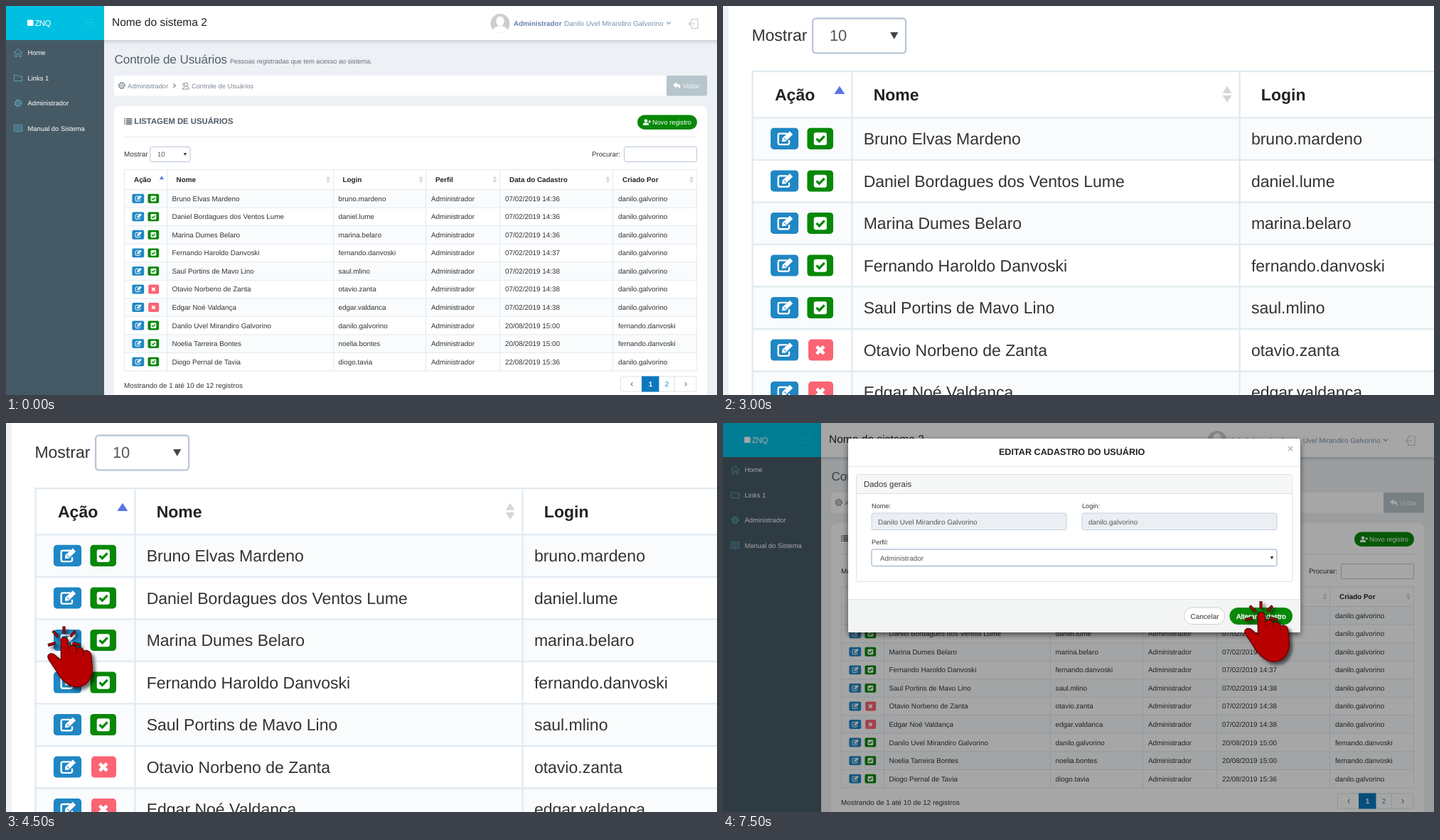
An HTML page that plays this animation: 1000x548 px, repeating every 8 s.

```html
<!DOCTYPE html>
<html lang="pt-BR">
<head>
<meta charset="utf-8">
<title>Controle de Usuários</title>
<style>
html, body { margin: 0; width: 100%; height: 100%; overflow: hidden; background: #edf0f4; }
svg { display: block; width: 1000px; height: 548px; font-family: "Liberation Sans", Arial, sans-serif; text-rendering: geometricPrecision; }
</style>
</head>
<body>
<svg id="stage" viewBox="0 0 1000 548"></svg>
<script>
const GREEN = '#078807', BLUE = '#1f87c4', LINE = '#e2eaf0';
const OWNER = 'Danilo Uvel Mirandiro Galvorino', OWNER_LOGIN = 'danilo.galvorino', CLERK = 'fernando.danvoski';

const text = (x, y, s, size = 9.9, fill = '#333', extra = '') =>
  `<text x="${x}" y="${y}" font-size="${size}" fill="${fill}" ${extra}>${s}</text>`;
const bold = (x, y, s, size = 9.9, fill = '#222', extra = '') =>
  text(x, y, s, size, fill, 'font-weight="700" ' + extra);
const rect = (x, y, w, h, fill, r = 0, extra = '') =>
  `<rect x="${x}" y="${y}" width="${w}" height="${h}" rx="${r}" fill="${fill}" ${extra}/>`;
const path = (d, fill, extra = '') => `<path d="${d}" fill="${fill}" ${extra}/>`;
const line = (d, stroke, width = 1, extra = '') =>
  `<path d="${d}" fill="none" stroke="${stroke}" stroke-width="${width}" ${extra}/>`;
const at = (x, y, body, scale = 1) => `<g transform="translate(${x} ${y}) scale(${scale})">${body}</g>`;
const group = (id, body) => `<g id="${id}">${body}</g>`;
const ellipse = (cx, cy, rx, ry, extra) => `<ellipse cx="${cx}" cy="${cy}" rx="${rx}" ry="${ry}" ${extra}/>`;

// Icons are drawn around their own centre.
const gear = c => `<circle r="4.4" fill="none" stroke="${c}" stroke-width="1.8" stroke-dasharray="2.1 1.35"/>` +
  `<circle r="3.7" fill="none" stroke="${c}"/><circle r="1.5" fill="none" stroke="${c}"/>`;
const home = c => line('M-6 0L0-5.5L6 0M-4.2-1.5V5.5H-1.5V1H1.5V5.5H4.2V-1.5', c);
const folder = c => line('M-5.5-4H-1.5L0-2.3H5.5V4.2H-5.5Z', c);
const book = c => line('M0-4Q-3-5.5-5.8-4.6V4.4Q-3 3.8 0 5Q3 3.8 5.8 4.4V-4.6Q3-5.5 0-4V5M-4.3-2.2H-1.6M-4.3 0H-1.6M-4.3 2.2H-1.6M1.6-2.2H4.3M1.6 0H4.3M1.6 2.2H4.3', c);
const people = c => `<circle cx="1" cy="-2" r="2.8" fill="none" stroke="${c}"/>` +
  line('M-4 5Q-3 1.2 0 .8M2 .8Q5 1.5 5.5 5H-5.5M-2-4.5Q-5-4-4-1Q-3.5 0-4 1', c);
const list = c => line('M-5.5-3.6H-4M-2.8-3.6H5.5M-5.5-1.2H-4M-2.8-1.2H5.5M-5.5 1.2H-4M-2.8 1.2H5.5M-5.5 3.6H-4M-2.8 3.6H5.5', c, 1.5);
const addUser = `<circle cx="-1.5" cy="-2" r="2.3" fill="#fff"/>` +
  path('M-5.5 4.2V2.5Q-5.2.6-3.2.6H.2Q2.2.6 2.5 2.5V4.2Z', '#fff') + line('M1.8-1H5.6M3.7-2.9V.9', '#fff', 1.3);
const edit = line('M1.5-3H-3Q-4-3-4-2V2.6Q-4 3.6-3 3.6H1.6Q2.6 3.6 2.6 2.6V1', '#fff', 1) +
  path('M-1.7 1.9L-1.5-.3L3-4.4L4.8-2.5L.5 1.7Z', '#fff') + line('M-.4-.2L.7.9', BLUE, .45);
const check = rect(-3.9, -3.8, 7.8, 7.7, '#fff', 1.3) + line('M-2.3-.1L-.6 1.6L2.5-1.6', GREEN, 1.4);
const cross = line('M-2.2-2.2L2.2 2.2M2.2-2.2L-2.2 2.2', '#fff', 2);

function tableRow([name, login, date, creator, off], i) {
  const y = 258.5 + 25.55 * i, mid = y + 12.75, base = y + 16.2;
  return rect(166.5, y, 805, 25.55, i % 2 ? '#fff' : '#f9fbfd') +
    line(`M166 ${y}H972`, LINE) +
    rect(177.4, mid - 6.5, 16.8, 12.9, BLUE, 2) + at(186, mid - .1, edit) +
    rect(off ? 200.2 : 199.5, mid - 6.5, off ? 15 : 15.7, 12.9, off ? '#fb6472' : GREEN, 2) +
    at(207.4, mid, off ? cross : check) +
    text(233.5, base, name) + text(467.5, base, login) + text(598, base, 'Administrador') +
    text(702, base, date) + text(861, base, creator);
}

const sorter = x => path(`M${x - 2.8} 243.7h5.6l-2.8-4.3zM${x - 2.8} 245.1h5.6l-2.8 4.3z`, '#d6d6d6');

function table() {
  const rows = [
    ['Bruno Elvas Mardeno', 'bruno.mardeno', '07/02/2019 14:36', OWNER_LOGIN],
    ['Daniel Bordagues dos Ventos Lume', 'daniel.lume', '07/02/2019 14:36', OWNER_LOGIN],
    ['Marina Dumes Belaro', 'marina.belaro', '07/02/2019 14:36', OWNER_LOGIN],
    ['Fernando Haroldo Danvoski', CLERK, '07/02/2019 14:37', OWNER_LOGIN],
    ['Saul Portins de Mavo Lino', 'saul.mlino', '07/02/2019 14:38', OWNER_LOGIN],
    ['Otavio Norbeno de Zanta', 'otavio.zanta', '07/02/2019 14:38', OWNER_LOGIN, true],
    ['Edgar Noé Valdança', 'edgar.valdanca', '07/02/2019 14:38', OWNER_LOGIN, true],
    [OWNER, OWNER_LOGIN, '20/08/2019 15:00', CLERK],
    ['Noelia Tarreira Bontes', 'noelia.bontes', '20/08/2019 15:00', CLERK],
    ['Diogo Pernal de Tavia', 'diogo.tavia', '22/08/2019 15:36', OWNER_LOGIN],
  ];
  const heads = [[180, 'Ação'], [239.5, 'Nome'], [473.5, 'Login'], [604, 'Perfil'], [708, 'Data do Cadastro'], [867, 'Criado Por']];
  return rows.map(tableRow).join('') +
    heads.map(([x, s]) => bold(x, 248, s)).join('') +
    [453, 583.5, 687.5, 846.5, 964].map(sorter).join('') +
    path('M215.8 244.2h6.4l-3.2-4.8z', '#5a74e4') +
    line('M226.5 230V514M460.5 230V514M590.5 230V514M694.5 230V514M853.5 230V514', LINE) +
    line('M166.5 230.5H971.5V514H166.5Z', LINE);
}

function page() {
  const grey = '#7c8792', icon = '#5ba3bb', pale = '#c3c9cf';
  const items = [['Home', home], ['Links 1', folder], ['Administrador', gear], ['Manual do Sistema', book]];
  return rect(0, 0, 1000, 548, '#edf0f4') +
    rect(138, 48, 862, 6, 'url(#barShadow)') + rect(138, 0, 862, 48, '#fff') +
    rect(0, 0, 138, 548, '#465a66') + rect(0, 0, 138, 48, '#00bfe1') +
    rect(30, 19.5, 8.5, 8.5, '#fff', 1) + text(40.5, 28, 'ZNQ', 11.4, '#fff', 'letter-spacing="-.6"') +
    line('M111 19.5H123M111 23.5H123M111 27.5H123', '#1ccbe0') +
    items.map(([s, draw], i) => at(17, 66 + 35.4 * i, draw(icon)) + text(30.5, 69.3 + 35.4 * i, s, 9.4, '#fff')).join('') +
    text(149, 28.3, 'Nome do sistema 2', 15.55, '#222') +
    '<circle cx="695" cy="24.5" r="13.5" fill="#cdcdd0"/>' +
    ellipse(695, 21.5, 5.6, 7, 'fill="#fff"') + path('M685 34Q686 29.5 692 28.5H698Q704 29.5 705 34Q695 42 685 34Z', '#fff') +
    bold(714, 27.5, 'Administrador', 9.9, '#6484aa') + text(785, 27.5, OWNER, 9.9, '#7a90ac') +
    line('M929 22.5L932 25.5L935 22.5', '#8b9cb2', 1.2) +
    line('M964 22V18.5H973V31.5H964V28M969 25H960.5M963.5 22L960.5 25L963.5 28', pale, 1.1) +
    text(152.5, 81, 'Controle de Usuários', 17.1, '#55606c', 'letter-spacing="-.1"') +
    text(315, 81, 'Pessoas registradas que tem acesso ao sistema.', 9.18, '#66707a') +
    rect(152, 98, 778, 28.5, '#fff', 3) + at(162.8, 112, gear(grey), .95) + text(171, 115.5, 'Administrador', 9.25, grey) +
    line('M235 109.5L238.5 112.3L235 115', grey, 1.1) + at(252.5, 112.5, people(grey), .9) +
    text(261, 115.5, 'Controle de Usuários', 9.27, grey) +
    rect(929, 98, 57, 28.5, '#b6c5cb', 2) + text(952, 116, 'Voltar', 9.3, '#f5f8f9') +
    path('M938 111.5L943 107.3V109.8Q948.5 110 948.5 113.5Q948.5 115.5 947 117Q947.5 113.5 943 113.3V115.8Z', '#fff') +
    rect(152, 141, 834, 420, '#fff', 8) + at(171.8, 162.6, list('#535d68')) +
    bold(180.3, 166.3, 'LISTAGEM DE USUÁRIOS', 11.3, '#4f5964') +
    rect(888, 153.5, 84, 20.5, GREEN, 10.2) + at(901.5, 163.8, addUser) + text(909, 167, 'Novo registro', 9.25, '#fff') +
    line('M166 184.5H972', '#e5e9ed') +
    text(166, 212, 'Mostrar') + rect(202.8, 198.5, 56.2, 21, '#fff', 2, 'stroke="#b9c7da"') +
    text(213, 212, '10', 9.4, '#555') + path('M249.6 206.9h4.8l-2.4 4.2z', '#444') +
    text(824, 211.5, 'Procurar:', 9.7) + rect(869.5, 198.5, 102, 21, '#fff', 2, 'stroke="#b9c7da"') +
    table() +
    text(166, 537.5, 'Mostrando de 1 até 10 de 12 registros') +
    rect(864.5, 522, 106.5, 21, '#fff', 2, 'stroke="#dde3e8"') + line('M940.5 522V543', '#dde3e8') +
    rect(894, 521.5, 24.5, 22, '#0b78be') +
    line('M881.5 530L879 532.7L881.5 535.4M954.8 530L957.3 532.7L954.8 535.4', '#777', 1.1) +
    bold(903.7, 536, '1', 9.9, '#fff') + text(926.7, 536, '2', 9.9, BLUE);
}

function lens() {
  const rim = (cx, cy, rx, ry) =>
    ellipse(cx, cy, rx, ry, 'fill="none" stroke="#8c8c8c" stroke-width="7"') +
    ellipse(cx, cy, rx, ry, 'fill="none" stroke="url(#silver)" stroke-width="5.4"') +
    ellipse(cx - .5, cy - .5, rx, ry, 'fill="none" stroke="#fff" stroke-width="1.6" opacity=".8"');
  return path('M58 313A140 118 0 0 0 338 313L338 350A136 118 0 0 1 64 350Z', 'url(#band)') +
    line('M64 350A137 117 0 0 0 338 350', '#8f8f8f', 5) + line('M64 349A137 117 0 0 0 338 349', '#ededed', 3) +
    line('M76 372Q112 452 200 453Q232 453 256 446', '#fff', 8, 'opacity=".8"') +
    line('M60 330Q78 434 197 441Q270 440 312 398', '#a9adb0', 2, 'opacity=".75"') +
    ellipse(198, 313, 137, 115, 'fill="url(#glass)"') +
    path('M66 290Q100 206 200 204Q280 206 318 258Q230 226 150 268Q95 300 76 350Q64 320 66 290Z', '#fff', 'opacity=".28"') +
    rim(198, 313, 138, 116.5) +
    line('M235 202Q300 220 326 270', '#858585', 3.5, 'opacity=".7"') +
    path('M258 422L292 409L306 420L278 452L256 459L262 440Z', 'url(#metal)', 'stroke="#333" stroke-width="1.5"') +
    path('M262 428L281 420L272 440L259 452Z', '#f4f4f4') +
    path('M293 414L330 436L346 434L322 468L305 455L279 432Q281 418 293 414Z', 'url(#metal)', 'stroke="#444"') +
    line('M286 421L318 446M294 416L327 440', '#2a2a2a', 3) + line('M283 428L313 452', '#fff', 4) +
    path('M347 432Q338 433 327 446L313 468Q309 476 314 482L371 548H468L414 486Z', '#171718', 'stroke="#e6e6e6" stroke-width="1.5"') +
    path('M323 462L316 475Q315 479 319 483L376 548H397L329 468Z', 'url(#shine)') +
    line('M348 436L411 488L462 546', '#555', 2.5) + line('M346 437Q337 442 324 462', '#77787a', 2.5);
}

function modal() {
  const field = (x, y, w, label, value, fill, stroke, indent) =>
    text(x, y - 7.5, label, 9.2) + rect(x, y, w, 23.5, fill, 2.5, `stroke="${stroke}"`) +
    text(x + indent, y + 15.5, value, 9.9, '#555');
  return rect(0, 0, 1000, 548, '#000', 0, 'opacity=".35"') +
    rect(176, 22, 636, 273, '#fff', 3, 'filter="url(#drop)"') +
    bold(490.7, 45.3, 'EDITAR CADASTRO DO USUÁRIO', 12.65, '#222', 'text-anchor="middle"') +
    line('M794.7 32.7L801.3 39.3M801.3 32.7L794.7 39.3', '#b5b5b5', 1.3) + line('M176 61.5H812', '#e5e7e9') +
    rect(187.5, 72.5, 613.5, 151, '#fff', 3, 'stroke="#dddfe1"') +
    rect(188, 73, 612.5, 26, '#f6f7f7', 2) + line('M188 99.5H801', '#dddfe1') +
    text(198, 90, 'Dados gerais', 11.4) +
    field(209, 127, 274, 'Nome:', OWNER, '#ebeff3', '#c3cedb', 9) +
    field(505, 127, 274, 'Login:', OWNER_LOGIN, '#ebeff3', '#c3cedb', 9) +
    field(209, 178, 570, 'Perfil:', 'Administrador', '#fff', '#8ea4c2', 12) +
    path('M769.8 188h4.4l-2.2 4z', '#222') +
    path('M176 248H812V292Q812 295 809 295H179Q176 295 176 292Z', '#f3f4f4') + line('M176 248.5H812', '#e3e5e6') +
    rect(648.5, 260, 57.5, 23.5, '#fff', 11.7, 'stroke="#cfd3d6"') + text(657.5, 275.5, 'Cancelar', 10) +
    rect(712.5, 260, 88.5, 24, GREEN, 12) + text(722, 275.5, 'Alterar cadastro', 9.9, '#fff', 'stroke="#fff" stroke-width=".4"');
}

function hand() {
  const rays = 'M81.5 286.5V297M66 293L73 301M97.5 293L90.5 301M59 313L70 310M93.5 310L104.5 313';
  const shape = 'M77 308Q77 302 82 302Q87 302 87 308L88 317Q90 312 95 313Q99 314 99 319Q102 315 106 317Q109 318 109 322' +
    'Q113 319 117 322Q120 324 120 330L121.5 347Q121 360 112 368Q98 376 86 367Q76 360 70 348L60 333Q57 327 62 325Q67 324 72 330L77.5 334Z';
  return '<g filter="url(#soft)">' + line(rays, '#2a0404', 4) + line(rays, '#b80808', 2) +
    path(shape, '#b90202', 'stroke="#5c0000" stroke-width="1.3"') +
    line('M88 316V325M99 318V326M109 321V328', '#7d0000', 1.2) + '</g>';
}

const stops = list => list.map(([o, c, a = 1]) => `<stop offset="${o}" stop-color="${c}" stop-opacity="${a}"/>`).join('');
const gradient = (id, x2, y2, list) => `<linearGradient id="${id}" x1="0" y1="0" x2="${x2}" y2="${y2}">${stops(list)}</linearGradient>`;
const shadow = (id, dx, dy, blur, opacity) =>
  `<filter id="${id}" x="-30%" y="-30%" width="160%" height="160%"><feDropShadow dx="${dx}" dy="${dy}" stdDeviation="${blur}" flood-opacity="${opacity}"/></filter>`;

const defs = '<defs>' +
  gradient('barShadow', 0, 1, [[0, '#cbd3da'], [1, '#edf0f4']]) +
  gradient('glass', .25, 1, [[0, '#fff', .92], [.3, '#fff', .7], [.6, '#eef2f5', .42], [1, '#fff', .3]]) +
  gradient('band', 1, 0, [[0, '#d6d9db', .9], [.2, '#f6f6f6', .85], [.6, '#e3e5e6', .82], [.85, '#fff', .88], [1, '#a9a9a9', .9]]) +
  gradient('silver', 1, .6, [[0, '#bcbcbc'], [.25, '#f5f5f5'], [.5, '#c4c4c4'], [.75, '#a2a2a2'], [1, '#e8e8e8']]) +
  gradient('metal', 1, .8, [[0, '#8d8d8d'], [.3, '#f8f8f8'], [.6, '#9a9a9a'], [1, '#e2e2e2']]) +
  gradient('shine', .6, 1, [[0, '#8b8c8e'], [.6, '#56575a'], [1, '#222']]) +
  shadow('drop', 0, 3.5, 4.5, .55) + shadow('soft', 4, 4, 2.2, .55) + '</defs>';

const stage = document.getElementById('stage');
stage.innerHTML = defs + group('page', page()) + group('lens', lens()) + group('modal', modal()) + group('hand', hand());
const part = id => stage.querySelector('#' + id);
const parts = { page: part('page'), lens: part('lens'), modal: part('modal'), hand: part('hand') };
const show = (node, on) => node.setAttribute('visibility', on ? 'visible' : 'hidden');

function draw(now) {
  const step = Math.floor((now % 8000) / 1500);
  const zoomed = step === 2 || step === 3, editing = step >= 4;
  parts.page.setAttribute('transform', zoomed ? 'translate(-346.4 -445) scale(2.33)' : 'scale(1)');
  parts.hand.setAttribute('transform', editing ? 'translate(675 -35.5)' : 'translate(0 0)');
  show(parts.lens, step === 1);
  show(parts.modal, editing);
  show(parts.hand, step === 3 || step === 5);
}

function tick() {
  draw(performance.now());
  requestAnimationFrame(tick);
}
tick();
</script>
</body>
</html>
```
